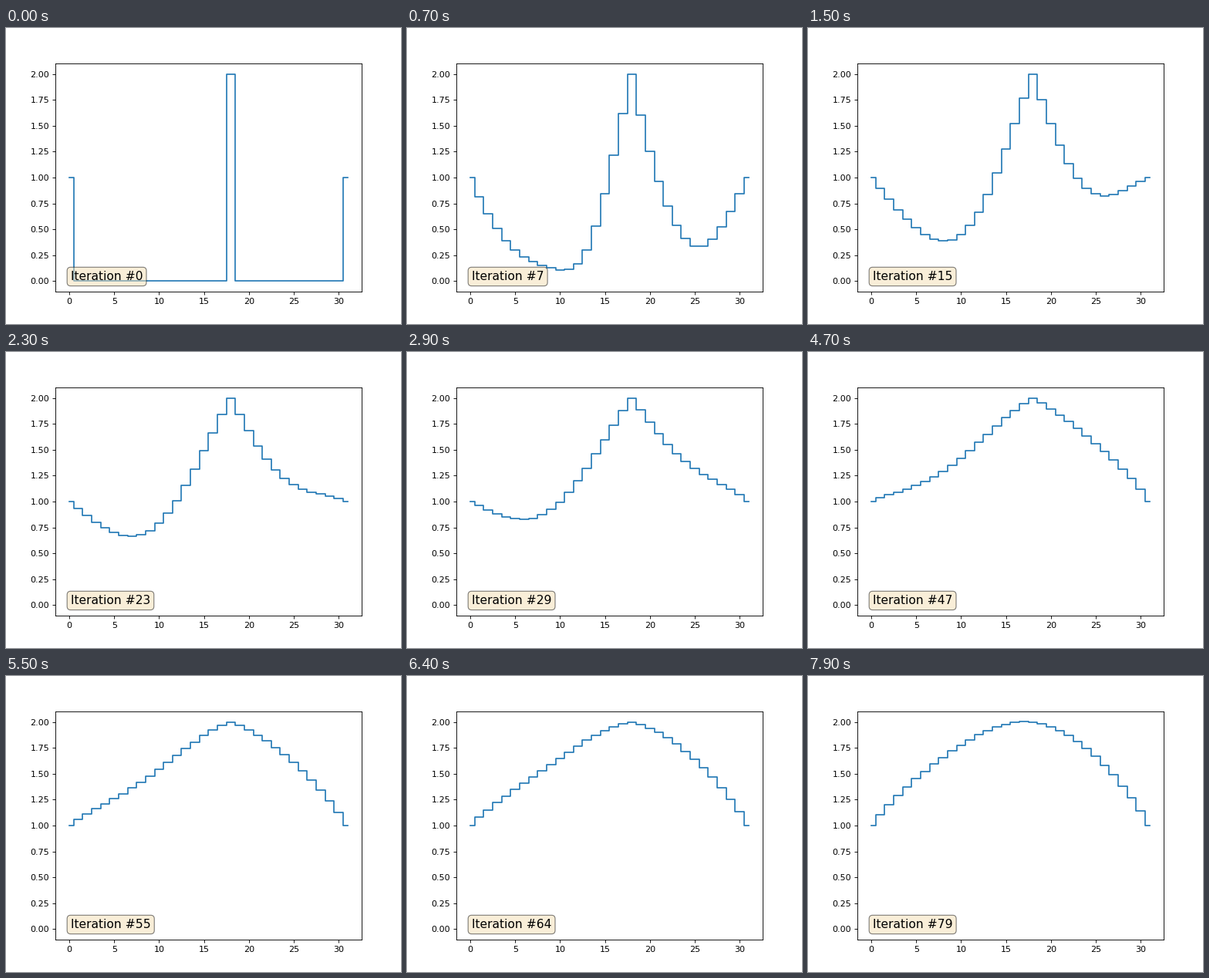
A matplotlib script for the animation above (8000 ms loop, 512x384 px).

```python
import numpy as np
import matplotlib.pyplot as plt
from matplotlib.animation import FuncAnimation

N = 32
STEPS = 80
PEAK = 18
SOURCE = 0.0108  # uniform load, already scaled by the squared cell size
FIXED = {0: 1.0, PEAK: 2.0, N - 1: 1.0}


def sweep(u):
    """One in-place Gauss-Seidel pass, left to right."""
    u = u.copy()
    for i in range(1, N - 1):
        if i not in FIXED:
            u[i] = 0.5 * (u[i - 1] + u[i + 1] + SOURCE)
    return u


def solve():
    u = np.zeros(N)
    for i, value in FIXED.items():
        u[i] = value
    states = [u]
    while len(states) < STEPS:
        states.append(sweep(states[-1]))
    return states


states = solve()

fig, ax = plt.subplots(figsize=(6.4, 4.8), dpi=80)
line, = ax.step(np.arange(N), states[0], where="mid")
ax.set_xlim(-0.05 * (N - 1), 1.05 * (N - 1))
ax.set_ylim(-0.1, 2.1)
label = ax.text(0.05, 0.05, "", transform=ax.transAxes, fontsize=14,
                bbox=dict(boxstyle="round", facecolor="wheat", alpha=0.5))


def update(k):
    line.set_ydata(states[k])
    label.set_text(f"Iteration #{k}")
    return line, label


anim = FuncAnimation(fig, update, frames=STEPS, interval=100,
                     repeat=True, repeat_delay=0)
plt.show()
```
